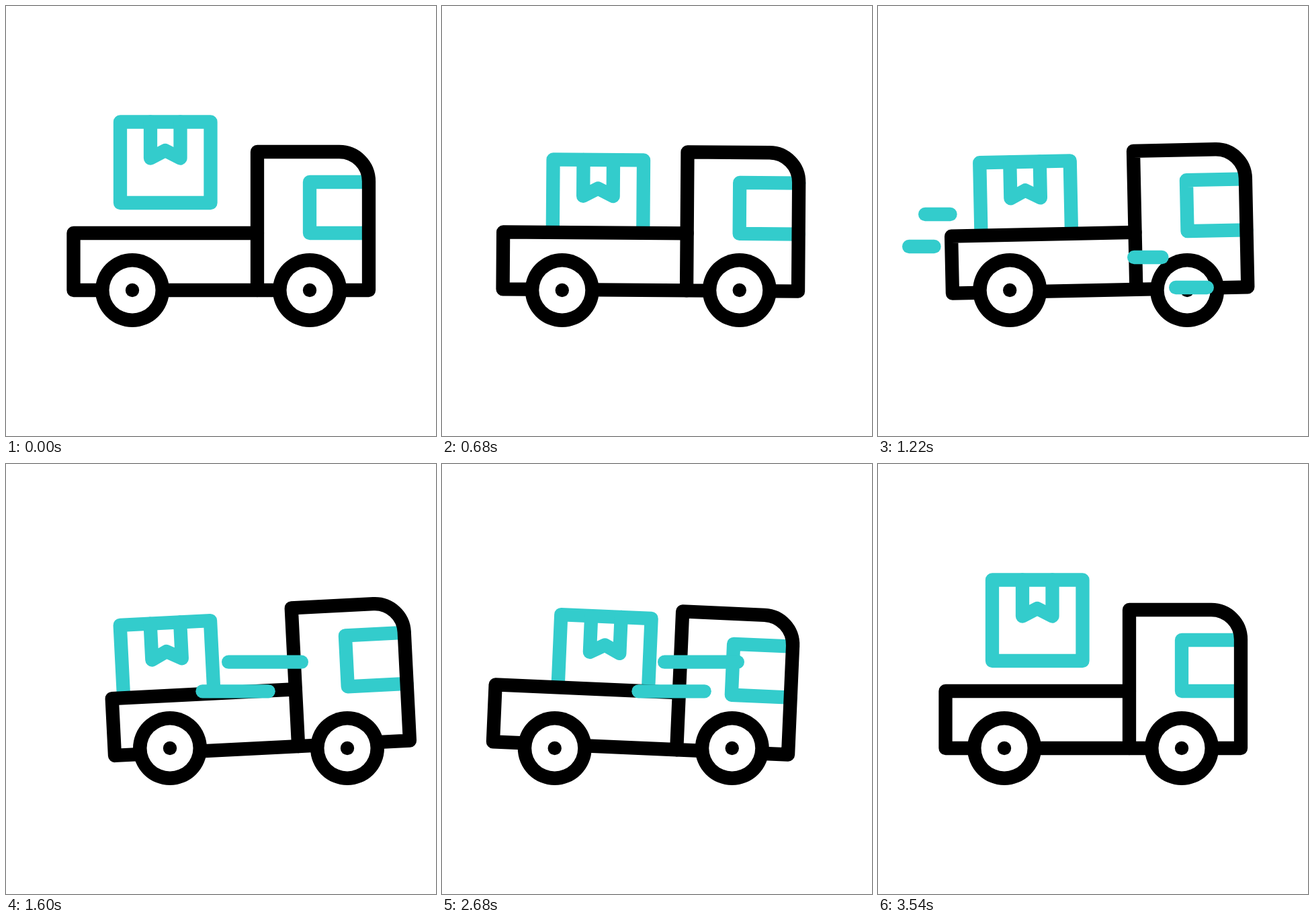
Animation, 640 px wide and 640 px high, one loop 3600 ms. Source, as an HTML page with a canvas:

```html
<!DOCTYPE html>
<html lang="en">
<head>
<meta charset="utf-8">
<title>Delivery truck</title>
<style>
  html, body { margin: 0; width: 100%; height: 100%; overflow: hidden; background: #fff; }
  canvas { display: block; width: 100vmin; height: 100vmin; }
</style>
</head>
<body>
<canvas id="stage" width="640" height="640"></canvas>
<script>
const ctx = document.getElementById('stage').getContext('2d');
const LOOP = 3600, TEAL = '#33cccc', BLACK = '#000';
const WIDTH = 20.3, RAIL = 338, FLOOR = 423;

// Poses of the truck: offset, lean in degrees, and how far the parcel slides.
const rest = { x: 0, lean: 0, slide: 0 };
const back = { x: -27, lean: 0.9, slide: 9 };
const drive = { x: 56, lean: -2.9, slide: -52 };
const brake = { x: -27, lean: 2.5, slide: 23.5 };

const moves = [
  { start: 520, end: 930, from: rest, to: back },
  { start: 930, end: 1578, from: back, to: drive },
  { start: 2190, end: 2785, from: drive, to: brake },
  { start: 2785, end: 3215, from: brake, to: rest }
];
const LEAD = 1.2; // lean and slide settle before the truck does

const clamp01 = v => Math.min(1, Math.max(0, v));
const mix = (a, b, u) => a + (b - a) * u;

function ease(u) {
  u = clamp01(u);
  return u * u * (3 - 2 * u);
}

const progress = (t, start, end) => (t - start) / (end - start);

function poseAt(t) {
  const move = moves.findLast(m => t >= m.start);
  if (!move) return rest;
  const { from, to } = move;
  const u = progress(t, move.start, move.end);
  const swing = ease(u * LEAD);
  return {
    x: mix(from.x, to.x, ease(u)),
    lean: mix(from.lean, to.lean, swing),
    slide: mix(from.slide, to.slide, swing)
  };
}

function poly(points, color, closed) {
  ctx.beginPath();
  points.forEach(([x, y]) => ctx.lineTo(x, y));
  if (closed) ctx.closePath();
  ctx.strokeStyle = color;
  ctx.stroke();
}

function parcel() {
  ctx.strokeStyle = TEAL;
  ctx.strokeRect(170, 172.5, 134.5, 120.5);
  poly([[215, 172.5], [215, 226.5], [237, 215], [259.5, 226.5], [259.5, 172.5]], TEAL);
}

function body() {
  const left = 100.5, wall = 374, right = 540, roof = 217, bend = 44;
  ctx.fillStyle = '#fff';
  ctx.fillRect(left, RAIL, wall - left, FLOOR - RAIL);
  poly([[right, 262], [452, 262], [452, RAIL], [right, RAIL]], TEAL);
  poly([[wall, RAIL], [left, RAIL], [left, FLOOR], [wall, FLOOR]], BLACK);
  ctx.beginPath();
  ctx.moveTo(wall, FLOOR);
  ctx.lineTo(wall, roof);
  ctx.arcTo(right, roof, right, roof + bend, bend);
  ctx.lineTo(right, FLOOR);
  ctx.closePath();
  ctx.stroke();
}

function disc(x, r, color) {
  ctx.beginPath();
  ctx.arc(x, FLOOR, r, 0, Math.PI * 2);
  ctx.fillStyle = color;
  ctx.fill();
}

function wheel(x) {
  disc(x, 55, BLACK);
  disc(x, 34.5, '#fff');
  disc(x, 10.2, BLACK);
}

// Grows leftward from its right end, rests, then shrinks into its left end.
function streak(t, start, end, left, y, length) {
  if (t < start || t >= end) return;
  const trim = 100;
  const l = left + length * (1 - ease((t - start) / trim));
  const r = left + length * (1 - ease((t - end + trim) / trim));
  const h = Math.min(WIDTH, r - l);
  if (h <= 0) return;
  ctx.beginPath();
  ctx.roundRect(l, y - h / 2, r - l, h, h / 2);
  ctx.fillStyle = TEAL;
  ctx.fill();
}

function streaks(t) {
  // A first gust on both sides of the bed as the truck pulls away.
  const gust = [[60, 310, 119], [36, 358, 119], [371, 374, 127], [433, 419, 138]];
  gust.forEach(([x, y, length]) => streak(t, 1000, 1270, x, y, length));

  // Then a pair that alternates between a high and a low place.
  const life = 480;
  for (let i = 0; i < 3; i++) {
    const start = 1480 + i * life, low = i % 2;
    const x = 321 + 23 * low, y = 294.7 + 71.5 * low;
    streak(t, start, start + life, x, y, 129);
    streak(t, start, start + life, x - 38.7, y + 43.6, 118.5);
  }
}

function draw(t) {
  const { x, lean, slide } = poseAt(t);
  const drop = 57 * (ease(t / 500) - ease(progress(t, 3215, 3535)));

  ctx.fillStyle = '#fff';
  ctx.fillRect(0, 0, 640, 640);
  ctx.lineWidth = WIDTH;
  ctx.lineJoin = ctx.lineCap = 'round';

  ctx.save();
  ctx.translate(x, 0);

  ctx.save();
  ctx.translate(320, 320);
  ctx.rotate(lean * Math.PI / 180);
  ctx.translate(-320, -320);
  ctx.save();
  ctx.translate(slide, drop);
  parcel();
  ctx.restore();
  body();
  ctx.restore();

  wheel(188);
  wheel(452);
  ctx.restore();

  streaks(t);
}

const begin = performance.now();
function tick() {
  draw((performance.now() - begin) % LOOP);
  requestAnimationFrame(tick);
}
tick();
</script>
</body>
</html>
```
